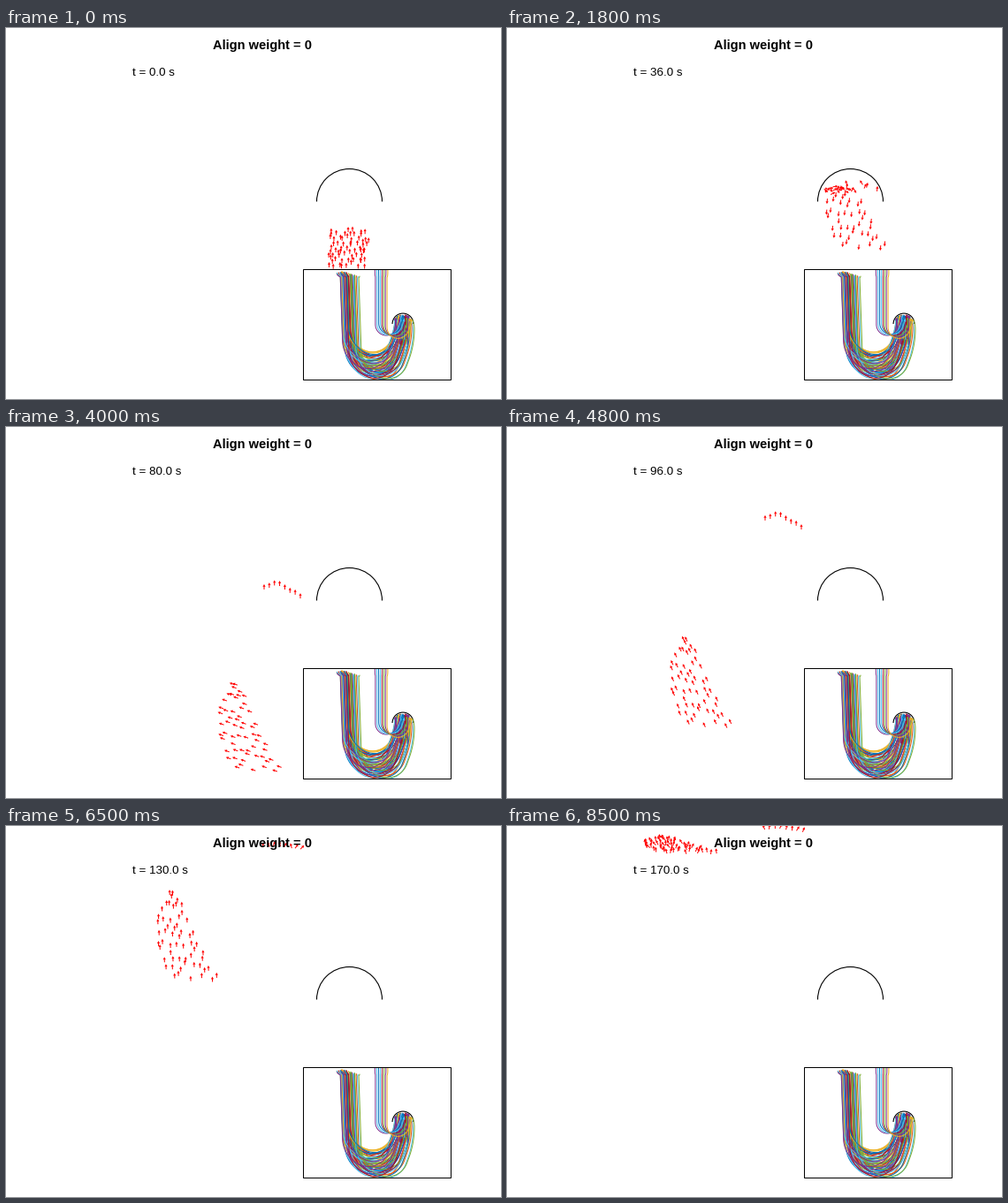
These frames come from a looping animation (560x420 px, 8600 ms). A matplotlib script:

```python
import numpy as np
import matplotlib.pyplot as plt
from matplotlib.animation import FuncAnimation
from matplotlib.collections import LineCollection
from matplotlib.patches import Arc, Rectangle

W, H, DPI = 560, 420, 100
FRAMES, INTERVAL = 86, 100
SPEED = 4.88                      # pixels per simulated second
T = np.arange(0, 170.01, 0.5)     # four samples per frame
REF = 220                         # sample of t = 110, where both groups are laid out
DOME = np.array([388.5, 196.5])
RADIUS = 37
ZOOM = 1 / 3.1
MINI = np.array([449.0, 335.0])
PALETTE = ["#0072BD", "#D95319", "#EDB120", "#7E2F8E", "#77AC30", "#4DBEEE", "#A2142F"]
rng = np.random.default_rng(4)


def scatter(n):
    """Evenly spread points in the unit square, slightly shaken."""
    i = np.arange(1, n + 1)[:, None]
    return (i * [0.7549, 0.5698] + rng.uniform(-0.04, 0.04, (n, 2))) % 1


def flock(n=58):
    """Slanted swarm: narrow at the top, wide and dense at the bottom."""
    a, b = scatter(n).T
    b = b ** 0.75
    left = 187 - 15 * np.sin(np.pi * b)
    right = 195 + 50 * b
    return np.stack([left + (right - left) * a, 169 + 103 * b], 1)


def strays(n=8):
    """Short row that drops off at its right end."""
    s = np.linspace(0, 1, n)
    return np.stack([292 + 41 * s, 32 + 2.5 * np.cos(9 * s) + 15 * s ** 4], 1)


def glide(base, times, angles):
    """Shared heading (degrees from down towards left) and the path of each agent."""
    phi = np.interp(T, times, angles)
    step = SPEED * np.stack([-np.sin(np.radians(phi)), np.cos(np.radians(phi))], 1)
    path = np.zeros((len(T), 2))
    path[1:] = np.cumsum((step[1:] + step[:-1]) / 2 * (T[1] - T[0]), axis=0)
    path -= path[REF]
    return base + path[:, None], np.repeat(phi[:, None], len(base), 1)


def jam(pos, phi, front, thick, spread):
    """Pile up behind a slowly rising front and fan out sideways."""
    x, y = pos[REF].T
    depth = (y - y.min()) / np.ptp(y) * thick
    wall = front + (150 - T)[:, None] * 0.5 + depth
    late = np.clip((wall - pos[:, :, 1]) / SPEED, 0, None)
    full = 1 - np.exp(-late / 8)
    side = pos[:, :, 0] - (x.min() + x.max()) / 2 + 5
    wobble = 30 * np.sin(0.35 * T[:, None] + rng.uniform(0, 6.28, len(x)))
    pos[:, :, 0] += side * spread * full
    pos[:, :, 1] = np.maximum(pos[:, :, 1], wall)
    phi += full * (wobble + 0.8 * side)


def by_rank(points, rank):
    return points[np.argsort(points[:, 0])][rank]


def gather(pos, phi):
    """Fly up into the dome, shuffle there, then leave on the free path."""
    n = pos.shape[1]
    out = np.argmax(pos[:, :, 1] >= 183, axis=0)
    rank = np.argsort(np.argsort(pos[out, np.arange(n), 0]))
    start = by_rank([365, 227] + scatter(n) * [46, 44], rank)
    ang = np.radians(rng.uniform(38, 156, n))
    rad = 33 - 21 * rng.uniform(0, 1, n) ** 1.8
    nest = by_rank(DOME + np.stack([rad * np.cos(ang), -rad * np.sin(ang)], 1), rank)
    phase = rng.uniform(0, 6.28, n)
    for i, k in enumerate(out):
        reach = np.hypot(*(nest[i] - start[i])) / SPEED
        leave = max(T[k], reach + 2)
        m = T < leave
        s = np.clip((T[m] - reach) / (leave - reach), 0, 1)
        for c in (0, 1):
            stops = [start[i, c], nest[i, c], pos[k, i, c]]
            drift = 3 * np.sin(np.pi * s) * np.sin(0.4 * T[m] + phase[i] + 1.6 * c)
            pos[m, i, c] = np.interp(T[m], [0, reach, leave], stops) + drift
        lean = np.interp(s, [0, 0.12, 0.6, 1], [180, 150, 165, 340])
        phi[m, i] = lean + 38 * np.sin(np.pi * s) * np.sin(0.5 * T[m] + phase[i])


main = glide(flock(), [21, 30, 52, 56.4, 80, 104.5, 200], [-30, 0, 20, 20, 110, 178, 178])
side = glide(strays(), [21, 30, 52, 54.4, 76.4, 200], [-30, 0, 20, 20, 180, 180])
jam(*main, front=22, thick=17, spread=0.25)
jam(*side, front=10, thick=4, spread=0.1)
pos = np.concatenate([main[0], side[0]], 1)
phi = np.concatenate([main[1], side[1]], 1)
gather(pos, phi)
SIZE = 6
U, V = -SIZE * np.sin(np.radians(phi)), -SIZE * np.cos(np.radians(phi))

plt.rcParams["font.family"] = "Liberation Sans"
px = 72 / DPI
fig = plt.figure(figsize=(W / DPI, H / DPI), dpi=DPI, facecolor="white")
ax = fig.add_axes([0, 0, 1, 1])
ax.set_xlim(0, W)
ax.set_ylim(H, 0)
ax.axis("off")


def dome(center, radius, z):
    ax.add_patch(Arc(center, 2 * radius, 2 * radius, theta1=180, theta2=360,
                     lw=1.1 * px, color="black", zorder=z))


def frame(z, **style):
    return ax.add_patch(Rectangle((336.5, 273.5), 167, 125, lw=px, snap=False,
                                  zorder=z, **style))


dome(DOME, RADIUS, 2)
arrows = ax.quiver(pos[0, :, 0], pos[0, :, 1], U[0], V[0], color="red",
                   pivot="mid", angles="uv", units="dots", scale_units="dots", scale=1,
                   width=1, headwidth=3.2, headlength=3, headaxislength=2.8, zorder=3)

# inset with the complete tracks
box = frame(4, fc="white", ec="none")
tracks = MINI + (pos - DOME) * ZOOM
n = pos.shape[1]
lines = LineCollection([tracks[:, i] for i in range(n)],
                       colors=rng.choice(PALETTE, n), linewidths=px, zorder=6)
ax.add_collection(lines, autolim=False)
lines.set_clip_path(box)
dome(MINI, RADIUS * ZOOM, 5)
frame(7, fill=False, ec="black")

ax.text(290, 24, "Align weight = 0", fontsize=14.67 * px, weight="bold",
        ha="center", va="baseline", zorder=8)
clock = ax.text(143, 54, "", fontsize=13.33 * px, ha="left", va="baseline", zorder=8)


def draw(i):
    k = 4 * i
    arrows.set_offsets(pos[k])
    arrows.set_UVC(U[k], V[k])
    clock.set_text(f"t = {2 * i:.1f} s")
    return arrows, clock


anim = FuncAnimation(fig, draw, frames=FRAMES, interval=INTERVAL,
                     repeat=True, repeat_delay=0)
plt.show()
```
